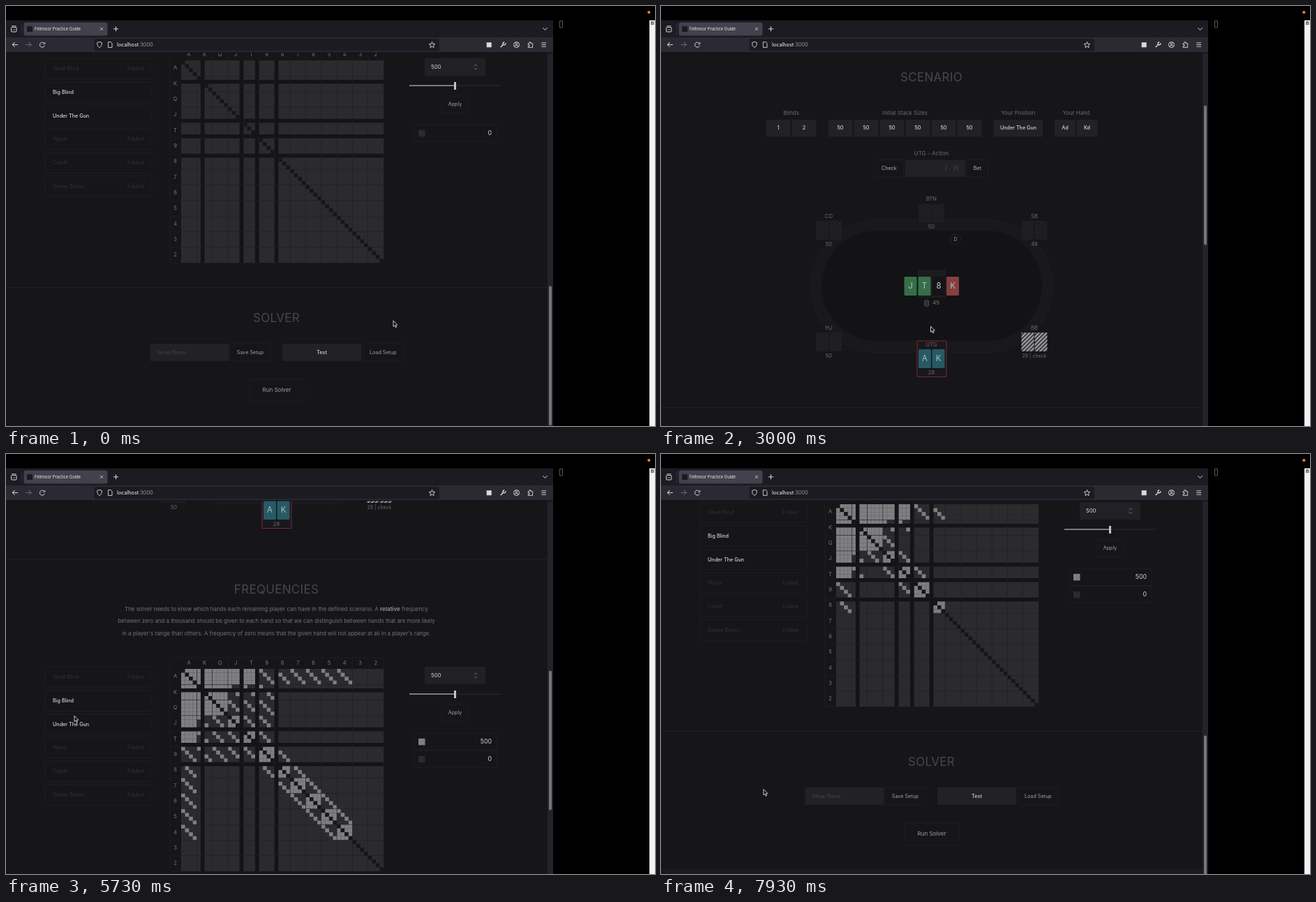
An HTML page with a canvas for the animation above (8 s loop, 930 by 602 pixels).

```html
<!DOCTYPE html>
<html lang="en">
<head>
<meta charset="utf-8">
<title>Feltmoor Practice Guide</title>
<style>
  html, body { margin: 0; width: 100%; height: 100%; overflow: hidden; background: #000; }
  canvas { display: block; width: 930px; height: 602px; }
</style>
</head>
<body>
<canvas id="stage"></canvas>
<script>
const W = 930, H = 602, LOOP = 8000, STEP = 1000 / 15;
const canvas = document.getElementById('stage');
const ctx = canvas.getContext('2d');
const dpr = window.devicePixelRatio || 1;
canvas.width = W * dpr;
canvas.height = H * dpr;

const PAGE = '#161518', BOX = '#222125', LINE = '#212024';
const DIM = '#333236', LABEL = '#6c6b6f', BRIGHT = '#d6d5d8', TITLE = '#48474b';
const RANKS = 'AKQJT98765432';
const UNIT = 290 / 52;
const BOARD = [5, 15, 19, 24];                      // card indices taken by the board
const RUNS = [[0, 5], [6, 15], [16, 19], [20, 24], [25, 52]];

const UTG = 'AA KK QQ JJ TT 99 88 AK AQ AJ AT KQ KJs KTs QJs JTs T9s A9s A8s'.split(' ');
const BB = UTG.concat('77 66 55 44 A7s A6s A5s A4s K9s QTs Q9s J9s 98s 87s 76s 65s 54s'.split(' '));
const RANGES = [[0, []], [4860, BB], [6130, UTG]].map(([t, hands]) => [t, new Set(hands)]);

const SCROLL = [[0, 655], [300, 330], [600, -97.5], [830, -145], [950, -145], [1250, -65],
  [1600, -7.5], [1850, 0], [3340, 0], [3700, 190], [4050, 390], [4350, 425],
  [7150, 425], [7500, 590], [7930, 661], [8000, 661]];
const MOUSE_X = [[0, 555], [1950, 555], [2600, 410], [3000, 386.5], [4150, 386.5], [4470, 268],
  [4780, 98], [5400, 92], [5900, 100], [6250, 100], [6700, 147], [8000, 147]];
const MOUSE_Y = [[0, 451], [1950, 451], [2600, 432], [3000, 459], [4150, 459], [4470, 442.5],
  [4780, 350], [5400, 352], [5900, 383], [6250, 383], [6700, 480.5], [8000, 480.5]];

// Monotone cubic interpolation through the keys
function track(keys, t) {
  let i = 0;
  while (i < keys.length - 2 && t >= keys[i + 1][0]) i++;
  const slope = k => k < 0 || k > keys.length - 2 ? 0
    : (keys[k + 1][1] - keys[k][1]) / (keys[k + 1][0] - keys[k][0]);
  const tangent = k => {
    const a = slope(k - 1), b = slope(k);
    return a * b <= 0 ? 0 : 2 * a * b / (a + b);
  };
  const [t0, v0] = keys[i], [t1, v1] = keys[i + 1], d = t1 - t0;
  const u = (t - t0) / d, u2 = u * u, u3 = u2 * u;
  return v0 * (2 * u3 - 3 * u2 + 1) + v1 * (3 * u2 - 2 * u3)
    + d * (tangent(i) * (u3 - 2 * u2 + u) + tangent(i + 1) * (u3 - u2));
}

function rect(x, y, w, h, fill) {
  ctx.fillStyle = fill;
  ctx.fillRect(x, y, w, h);
}

function round(x, y, w, h, r, fill, stroke, width = 1) {
  ctx.beginPath();
  ctx.roundRect(x, y, w, h, r);
  if (fill) { ctx.fillStyle = fill; ctx.fill(); }
  if (stroke) { ctx.strokeStyle = stroke; ctx.lineWidth = width; ctx.stroke(); }
}

function path(points, color, width = 1, fill) {
  ctx.beginPath();
  points.forEach(([x, y], i) => i ? ctx.lineTo(x, y) : ctx.moveTo(x, y));
  if (fill) { ctx.closePath(); ctx.fillStyle = fill; ctx.fill(); }
  ctx.strokeStyle = color;
  ctx.lineWidth = width;
  ctx.stroke();
}

function arc(x, y, r, color, from = 0, to = 2 * Math.PI, width = 1) {
  ctx.beginPath();
  ctx.arc(x, y, r, from, to);
  ctx.strokeStyle = color;
  ctx.lineWidth = width;
  ctx.stroke();
}

function font(size, weight = 400) {
  ctx.font = `${weight} ${size}px Inter, sans-serif`;
}

function text(str, x, y, size, color, align = 'center', weight = 400) {
  font(size, weight);
  ctx.textAlign = align;
  ctx.textBaseline = 'middle';
  ctx.fillStyle = color;
  ctx.fillText(str, x, y);
}

// Centred line in which every second part is bold
function rich(parts, x, y, size, color, boldColor) {
  const weight = i => i % 2 ? 700 : 400;
  const widths = parts.map((p, i) => { font(size, weight(i)); return ctx.measureText(p).width; });
  let left = x - widths.reduce((a, b) => a + b) / 2;
  parts.forEach((p, i) => {
    text(p, left, y, size, i % 2 ? boldColor : color, 'left', weight(i));
    left += widths[i];
  });
}

function title(str, y) {
  ctx.letterSpacing = '0.3px';
  text(str, 387.5, y, 17, TITLE);
  ctx.letterSpacing = '0px';
}

function field(str, x, y, w, h = 24.5) {
  rect(x, y, w, h, BOX);
  text(str, x + w / 2, y + h / 2, 7.2, BRIGHT, 'center', 500);
}

function button(str, x, y, w, h = 24.5, size = 7.2, color = '#a09fa3') {
  round(x, y, w, h, 1, null, LINE, 0.8);
  text(str, x + w / 2, y + h / 2, size, color);
}

function hatch(x, y, back, stripe) {
  for (const left of [x, x + 19]) {
    ctx.save();
    ctx.beginPath();
    ctx.roundRect(left, y, 18, 27, 1);
    ctx.clip();
    rect(left, y, 18, 27, back);
    for (let k = -27; k < 20; k += 5.6) path([[left + k, y + 28], [left + k + 28, y]], stripe, 1.9);
    ctx.restore();
  }
}

function card(letter, x, y, color, ink = '#b9b8ba') {
  round(x, y, 18, 27, 1.5, color);
  text(letter, x + 9, y + 13.8, 11.5, ink);
}

function seat(name, stack, x, y, live) {
  text(name, x, y, 7.6, LABEL);
  hatch(x - 18.5, y + 6.5, live ? '#3c3b3e' : '#1b1a1d', live ? '#a2a1a3' : '#232225');
  text(stack, x, y + 40, live ? 7 : 7.6, LABEL);
}

function scenario() {
  text('Feltmoor Guide', 387.5, -16.5, 24.5, '#918f93');
  rich(["Solve any postflop spot you like. It's completely ", 'free', '!'], 387.5, 15, 9.9, '#c9c8cb', '#dddcdf');
  rect(0, 57, 776, 1, LINE);
  title('SCENARIO', 102.5);

  text('Blinds', 186.5, 154, 7.9, LABEL);
  text('Initial Stack Sizes', 349.5, 154, 7.9, LABEL);
  text('Your Position', 512, 154, 7.9, LABEL);
  text('Your Hand', 595, 154, 7.9, LABEL);
  field('1', 150.5, 163, 35);
  field('2', 187.5, 163, 35);
  for (let i = 0; i < 6; i++) field('50', 239.5 + 37 * i, 163, 35);
  field('Under The Gun', 477, 163, 70);
  field('Ad', 564, 163, 30);
  field('Kd', 595.5, 163, 30);

  text('UTG - Action', 387.5, 211.5, 8.1, LABEL);
  button('Check', 306, 220.5, 41.5, 24.5, 7.2, '#b5b4b7');
  rect(349.5, 220.5, 86.5, 24.5, BOX);
  text('2 - 28', 427, 233, 7.2, '#48474b', 'right');
  button('Bet', 438, 220.5, 30.5, 24.5, 7.2, '#b5b4b7');

  round(214.5, 306.5, 347, 190, 95, '#19181b', '#201f22', 0.8);
  round(230, 322, 316, 158, 79, '#131215');
  rect(368, 378, 40, 40, '#1c1b1e');
  arc(422, 334.5, 7.5, '#29282b', 0, 2 * Math.PI, 0.8);
  text('D', 422, 334.7, 7, '#99989b');

  card('J', 348.5, 388, '#356f48');
  card('T', 368.5, 388, '#356f48');
  card('8', 389, 388, '#151417', '#c5c4c6');
  card('K', 409, 388, '#84403f');
  for (let i = 0; i < 4; i++) {
    ctx.beginPath();
    ctx.ellipse(380.7, 422.8 + i * 2.2, 3, 1.1, 0, i ? 0 : -Math.PI, Math.PI);
    ctx.strokeStyle = LABEL;
    ctx.lineWidth = 0.7;
    ctx.stroke();
  }
  path([[377.7, 422.8], [377.7, 429.4]], LABEL, 0.6);
  path([[383.7, 422.8], [383.7, 429.4]], LABEL, 0.6);
  text('45', 394, 426, 7.8, '#7b7a7d');

  seat('BTN', '50', 387.5, 277);
  seat('CO', '50', 240.5, 301.5);
  seat('SB', '49', 535, 301.5);
  seat('HJ', '50', 240.5, 461.5);
  seat('BB', '28 | check', 535, 461.5, true);
  round(367, 480, 42, 51.5, 0.5, '#19181b', '#7c2640', 1);
  text('UTG', 387.5, 486, 7.6, LABEL);
  card('A', 369, 492, '#265a64');
  card('K', 388.5, 492, '#265a64');
  text('28', 387.5, 526, 7.6, LABEL);
  rect(0, 575, 776, 1, LINE);
}

function players() {
  const names = ['Small Blind', 'Big Blind', 'Under The Gun', 'Hijack', 'Cutoff', 'Dealer Button'];
  names.forEach((name, i) => {
    const y = 745 + 33.7 * i, live = i === 1 || i === 2;
    round(55.5, y - 14.7, 153.5, 29.4, 1, null, LINE, 0.8);
    text(name, 67, y, 7.2, live ? BRIGHT : DIM, 'left', live ? 500 : 400);
    if (!live) text('Folded', 197, y, 7.2, DIM, 'right');
  });
}

function grid(hands) {
  const left = 251, top = 733;
  round(235, 717, 306, 306, 0, null, '#232226', 0.8);
  [...RANKS].forEach((r, i) => {
    const mid = (i * 4 + 2) * UNIT;
    text(r, left + mid, 725, 7.6, '#77767a');
    text(r, 242.5, top + mid, 7.6, '#77767a');
    if (i) {
      rect(left + i * 4 * UNIT, 717, 0.6, 16, '#201f23');
      rect(235, top + i * 4 * UNIT, 16, 0.6, '#201f23');
    }
  });
  rect(left, top, 290, 290, '#141316');
  for (const [a, b] of RUNS)
    for (const [c, d] of RUNS)
      rect(left + a * UNIT, top + c * UNIT, (b - a) * UNIT, (d - c) * UNIT, '#2b2a2d');

  for (let row = 0; row < 52; row++) {
    if (BOARD.includes(row)) continue;
    for (let col = 0; col < 52; col++) {
      if (BOARD.includes(col)) continue;
      const high = Math.min(row, col) >> 2, low = Math.max(row, col) >> 2;
      const hand = RANKS[high] + RANKS[low];
      const suited = row % 4 === col % 4;
      const x = left + col * UNIT, y = top + row * UNIT;
      if (row === col) rect(x, y, UNIT, UNIT, '#161518');
      else if (hands.has(hand) || suited && hands.has(hand + 's')) rect(x, y, UNIT + 0.05, UNIT + 0.05, '#7f7e81');
    }
  }
  for (let i = 1; i < 13; i++) {
    const p = i * 4 * UNIT - 0.3;
    rect(left + p, top, 0.6, 290, '#1f1e21');
    rect(left, top + p, 290, 0.6, '#1f1e21');
  }
}

function legend(value, y, color) {
  round(585, y - 12, 118, 24, 1, null, LINE, 0.8);
  rect(591, y - 4.5, 9.5, 9.5, color);
  text(value, 696, y, 8.8, BRIGHT, 'right');
}

function frequencies(hands) {
  title('FREQUENCIES', 620);
  rich(['The solver needs to know which hands each remaining player can have in the defined scenario. A ',
    'relative', ' frequency'], 387.5, 647.5, 7.9, '#737276', '#8b8a8e');
  text('between zero and a thousand should be given to each hand so that we can distinguish between hands that are more likely',
    387.5, 665, 7.9, '#737276');
  text("in a player's range than others. A frequency of zero means that the given hand will not appear at all in a player's range.",
    387.5, 682.5, 7.9, '#737276');
  players();
  grid(hands);

  rect(600, 730, 87, 25, '#212024');
  text('500', 609, 742.6, 7.8, BRIGHT, 'left');
  path([[670.5, 741], [672.8, 738.8], [675.1, 741]], '#858488', 0.8);
  path([[670.5, 744], [672.8, 746.2], [675.1, 744]], '#858488', 0.8);
  rect(578, 768.5, 132, 1.2, '#29282c');
  rect(578, 768.2, 65, 1.8, '#858488');
  rect(642, 764, 3, 11, '#c4c3c6');
  button('Apply', 625, 784, 37, 24.5);
  if (hands.size) {
    legend('500', 837.3, '#7f7e81');
    legend('0', 862.3, '#2b2a2d');
  } else legend('0', 837.3, '#2b2a2d');
}

function solver() {
  rect(0, 1058, 776, 1, LINE);
  title('SOLVER', 1103);
  rect(206.5, 1139, 113, 25, BOX);
  text('Setup Name', 216, 1151.5, 7.2, '#454448', 'left');
  button('Save Setup', 321, 1139, 58, 25);
  field('Test', 396, 1139, 113, 25);
  button('Load Setup', 511.5, 1139, 57.5, 25);
  button('Run Solver', 349, 1190, 78, 32, 8);
  rect(0, 1256, 776, 80, '#1b1a1d');
}

function chrome() {
  const ink = '#d9d9df', dim = '#6b6a74';
  rect(0, 0, W, 21, '#000');
  rect(784, 0, 146, H, '#000');
  rect(0, 20.5, 784, 24.5, '#1c1b22');
  rect(0, 45, 784, 21.5, '#2b2a33');
  rect(0, 66.5, 784, 1, '#121116');

  // Tab strip
  round(7.5, 30.5, 7.5, 6.5, 1, null, ink);
  path([[8, 28.7], [14.5, 28.7]], ink, 0.9);
  path([[9.6, 33.2], [11.2, 34.8], [12.8, 33.2]], ink, 0.8);
  rect(22, 25, 0.7, 17, '#3b3a43');
  round(25.5, 23.5, 120, 19, 3, '#42414d');
  rect(30, 29, 8, 8, '#1b1b20');
  text('Feltmoor Practice Guide', 41, 33.2, 5.8, '#eeeef2', 'left');
  path([[135, 30.8], [139, 34.8]], ink, 0.8);
  path([[139, 30.8], [135, 34.8]], ink, 0.8);
  path([[154, 32.8], [161, 32.8]], ink);
  path([[157.5, 29.3], [157.5, 36.3]], ink);
  path([[769.3, 31.2], [772.5, 34.4], [775.7, 31.2]], ink);

  // Toolbar
  path([[17, 55.5], [9.3, 55.5], [12.6, 52.2], [9.3, 55.5], [12.6, 58.8]], ink);
  path([[28.5, 55.5], [36.2, 55.5], [32.9, 52.2], [36.2, 55.5], [32.9, 58.8]], dim);
  arc(52, 55.6, 3.4, ink, 0.3, 5.4);
  path([[55.8, 51.6], [55.8, 54.3], [53, 54.3]], ink, 0.9);
  round(126.5, 47, 494.5, 17.5, 2.5, '#1c1b22');
  path([[134, 51.3], [137.4, 52.5], [136.8, 56.8], [134, 59.8], [131.2, 56.8], [130.6, 52.5], [134, 51.3]], ink, 0.9);
  path([[146.4, 51.6], [150.2, 51.6], [152, 53.4], [152, 59.4], [146.4, 59.4], [146.4, 51.6]], ink, 0.9);
  text('localhost', 159, 55.8, 7.3, '#f1f1f4', 'left');
  const w = ctx.measureText('localhost').width;
  text(':3000', 159 + w, 55.8, 7.3, '#9b9aa3', 'left');
  const star = Array.from({ length: 11 }, (_, i) => {
    const a = -Math.PI / 2 + i * Math.PI / 5, r = i % 2 ? 2 : 4.5;
    return [610.5 + r * Math.cos(a), 55.9 + r * Math.sin(a)];
  });
  path(star, ink, 0.9);

  rect(688.7, 52.2, 7, 7, ink);
  path([[708.8, 59], [713, 54.8]], ink, 1.6);
  arc(714, 53.8, 1.9, ink, -0.3, 4.9, 1.4);
  arc(731.5, 55.5, 4, ink);
  arc(731.5, 54.4, 1.3, ink);
  arc(731.5, 59, 2.6, ink, 3.6, 5.8);
  path([[748.2, 53.6], [750, 53.6], [750, 51.8], [752, 51.8], [752, 53.6], [754.6, 53.6], [754.6, 59.4],
    [748.2, 59.4], [748.2, 57.7], [750, 57.7], [750, 55.5], [748.2, 55.5], [748.2, 53.6]], ink, 0.9);
  for (const y of [52.8, 55.5, 58.2]) path([[767.3, y], [774, y]], ink, 0.9);

  // Desktop behind the window
  round(793.5, 21.5, 4, 9.5, 0.5, null, '#737373', 0.8);
  rect(922, 20.5, 8, H, '#f3f3f3');
  rect(924, 22.3, 4.5, 4.5, '#5b5b5b');
  path([[924.5, 24], [928, 24]], '#dddddd', 0.6);
  path([[924.5, 25.5], [928, 25.5]], '#dddddd', 0.6);
  ctx.beginPath();
  ctx.arc(921.3, 9, 2.1, 0, 2 * Math.PI);
  ctx.fillStyle = '#e58a2c';
  ctx.fill();
}

function pointer(x, y) {
  const shape = [[0, 0], [0, 8.4], [1.9, 6.7], [3.2, 9.7], [4.6, 9.1], [3.3, 6.2], [5.8, 6.1], [0, 0]];
  path(shape.map(([a, b]) => [x + a, y + b]), '#dedede', 0.9, '#0b0b0b');
}

function draw(now) {
  const t = Math.floor((now % LOOP + 5) / STEP) * STEP;
  const scroll = track(SCROLL, t);
  const hands = RANGES.filter(([start]) => t >= start).pop()[1];

  ctx.setTransform(dpr, 0, 0, dpr, 0, 0);
  rect(0, 0, W, H, PAGE);
  ctx.save();
  ctx.beginPath();
  ctx.rect(0, 67, 776, H - 67);
  ctx.clip();
  ctx.translate(0, -scroll);
  scenario();
  frequencies(hands);
  solver();
  ctx.restore();

  rect(776, 67, 8, H - 67, '#242327');
  round(778, 142.5 + scroll * 0.395, 4, 200, 2, '#767579');
  chrome();
  pointer(track(MOUSE_X, t), track(MOUSE_Y, t));
  requestAnimationFrame(() => draw(performance.now() - start));
}

const start = performance.now();
draw(0);
</script>
</body>
</html>
```
